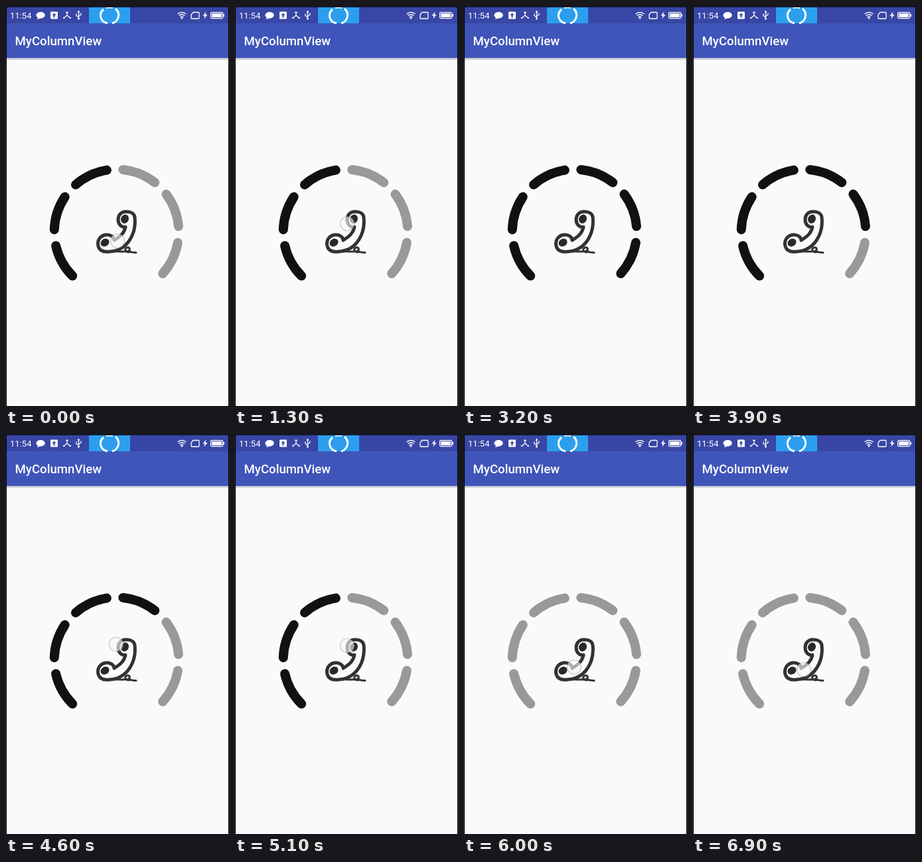
An HTML page for the animation above (7900 ms loop, 336x601 px).

```html
<!DOCTYPE html>
<html lang="en">
<head>
<meta charset="utf-8">
<title>Volume dial</title>
<style>
  html, body { margin: 0; width: 100%; height: 100%; overflow: hidden; background: #fafafa; }
  svg { display: block; width: 336px; height: 601px; font-family: Roboto, sans-serif; fill: #fff; }
  .line { fill: none; stroke-linecap: round; stroke-linejoin: round; }
  .thin { fill: none; stroke: #fff; stroke-width: 1.3; }
</style>
</head>
<body>
<svg viewBox="0 0 336 601">
  <defs>
    <linearGradient id="shade" x2="0" y2="1">
      <stop stop-color="#b4b6c2"/>
      <stop offset="1" stop-color="#fafafa"/>
    </linearGradient>
  </defs>
  <rect width="336" height="601" fill="#fafafa"/>
  <rect y="78" width="336" height="4" fill="url(#shade)"/>
  <rect y="26" width="336" height="52" fill="#3f55b9"/>
  <rect width="336" height="26" fill="#3846a5"/>
  <text x="13.5" y="59" font-size="18.67" font-weight="500">MyColumnView</text>

  <!-- status bar -->
  <text x="6" y="18.5" font-size="13.07">11:54</text>
  <path d="M52 9c9 0 9 9.500 0 9.500l-5 1.500 1-2.500c-5-3-2-8.500 4-8.500z"/>
  <rect x="67" y="8.500" width="11" height="11" rx="1"/>
  <path d="M72.500 10.500l3 3.500h-2v3.500h-2v-3.500h-2z" fill="#3846a5"/>
  <path class="thin" d="M92 9v5l-4.500 4M92 14l4.500 4M90 9.500h4M86 17l2 2M98 17l-2 2"/>
  <path class="thin" d="M109.500 8v11M109.500 17l-3.500-2.500v-3M109.500 15.500l3.500-2.500v-2.500"/>
  <path d="M107.500 9.500l2-3 2 3z"/>
  <circle cx="109.500" cy="19" r="1.500"/>
  <rect x="125" y="2" width="62" height="24" fill="#2b9fee"/>
  <path class="thin" style="stroke-width:3" d="M153 26c-11-2-14-14-6-21M151 2.500q5-1.500 10 0M165 4c8 7 5 19-5 22"/>
  <path class="thin" d="M258.500 12q6.500-5 13 0M260.500 14.500q4.500-3.500 9 0M262.500 17q2.500-2 5 0"/>
  <circle cx="265" cy="18.500" r="1.200"/>
  <path class="thin" d="M282 9.500h8q1 0 1 1v7.500q0 1-1 1h-10q-1 0-1-1v-5z"/>
  <path d="M301.500 8.500l-5 6h3l-1 5 5-6.500h-3z"/>
  <rect class="thin" x="308.600" y="9.600" width="18" height="9" rx="1.500"/>
  <path d="M310.300 11.300h14.600v5.600h-14.600zM327 12h2v4h-2z"/>
  <path d="M0 0h336v2H0z" fill="#15182e"/>
  <path d="M0 0h1v601H0zM335 0h1v601h-1z" fill="#000"/>

  <g id="dial" class="line" stroke-width="14"></g>

  <!-- handset -->
  <g stroke="#313233">
    <path class="line" stroke-width="5" d="M182 309C174 308 169 314 169 321C169 328 174 333 180 332C178 342 171 347 163 352C163 346 156 343 149 344C141 346 137 353 139 361C141 368 148 370 156 369C173 368 184 358 190 345C195 334 195 326 194 317C193 312 188 309 182 309z"/>
    <path class="line" stroke-width="3" d="M163 369C172 368 182 371 186 367C188 363 182 361 180 365C178 369 184 371 187 369Q190 370.500 196 370.500"/>
  </g>
  <ellipse cx="179" cy="320" rx="5.800" ry="6.800" transform="rotate(25 179 320)" fill="#29292a"/>
  <ellipse cx="149" cy="355.500" rx="6.800" ry="5.600" transform="rotate(-30 149 355.500)" fill="#29292a"/>

  <circle id="touch" r="10.500" fill="#fafafa" fill-opacity=".62" stroke="#8d94b8" stroke-opacity=".5" stroke-width="1.200"/>
</svg>
<script>
const LOOP = 7900, TICK = 100;
const CX = 166.5, CY = 339.2, RADIUS = 93.8;

// Swipes: start, end, x, y, then movement per tick
const swipes = [
  [0, 1300, 168, 353, 0, 0],
  [1300, 1600, 169, 327, -1, -24],
  [2100, 2500, 164, 371, 0.5, -25],
  [2900, 3200, 170, 372, 0, -21.5],
  [3600, 3900, 160, 329, 0, 21],
  [4200, 4500, 165, 318, -2, 24],
  [4600, 4900, 166, 316, -3, 25],
  [5100, 5400, 169, 318, 1, 24],
  [5500, 5700, 172, 341, 0, 24],
  [5900, 6200, 166, 332, 0, 18],
  [6900, LOOP, 167, 354, 0, 0]
];
// Volume changes: time, level
const levels = [[0, 3], [1400, 4], [2300, 5], [3000, 6], [3700, 5],
  [4300, 4], [4700, 3], [5200, 2], [5600, 1], [6000, 0]];

const dial = document.getElementById('dial');
const touch = document.getElementById('touch');

function point(degrees) {
  const a = degrees * Math.PI / 180;
  return `${CX + RADIUS * Math.cos(a)} ${CY + RADIUS * Math.sin(a)}`;
}

const bars = Array.from({ length: 6 }, (_, i) => {
  const bar = document.createElementNS('http://www.w3.org/2000/svg', 'path');
  const start = 135 + 47 * i;
  bar.setAttribute('d', `M${point(start)}A${RADIUS} ${RADIUS} 0 0 1 ${point(start + 32)}`);
  return dial.appendChild(bar);
});

function draw(now) {
  const t = now % LOOP;
  const level = levels.findLast(([time]) => time <= t)[1];
  bars.forEach((bar, i) => bar.setAttribute('stroke', i < level ? '#111' : '#999'));

  const swipe = swipes.find(([start, end]) => t >= start && t < end);
  touch.setAttribute('visibility', swipe ? 'visible' : 'hidden');
  if (swipe) {
    const [start, , x, y, dx, dy] = swipe;
    const n = Math.floor((t - start) / TICK);
    touch.setAttribute('cx', x + dx * n);
    touch.setAttribute('cy', y + dy * n);
  }
}

const begin = performance.now();
function tick() {
  draw(performance.now() - begin);
  requestAnimationFrame(tick);
}
tick();
</script>
</body>
</html>
```
